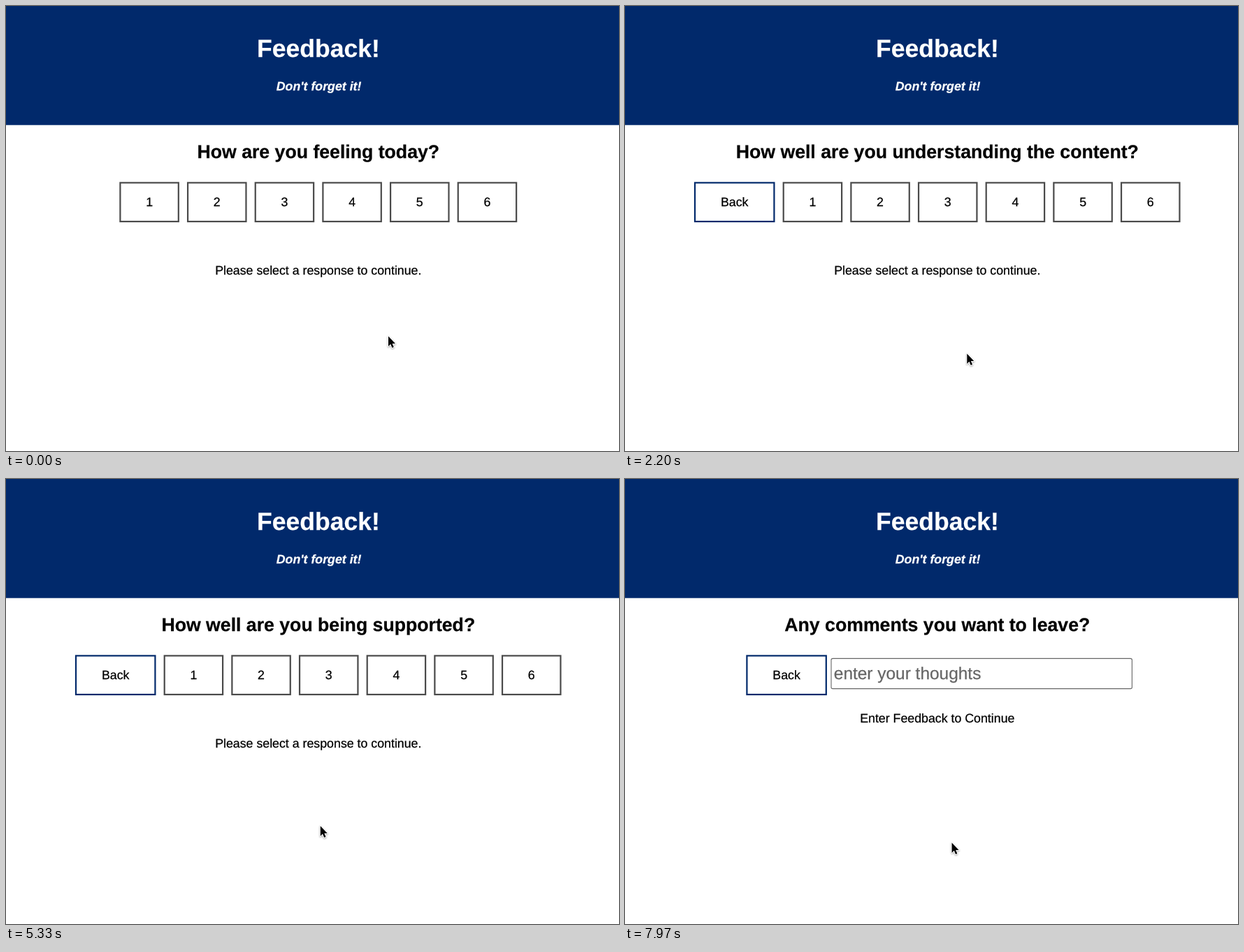
Recreate the animation shown at these times as an HTML page. Size 877 by 638 pixels, loop 8000 ms.

```html
<!DOCTYPE html>
<html lang="en">
<head>
<meta charset="utf-8">
<title>Feedback</title>
<style>
html, body { margin: 0; width: 100%; height: 100%; overflow: hidden; background: #fff; }
svg { display: block; width: 877px; height: 638px; cursor: default; }
text {
  font: 17.78px "Liberation Sans", Arial, Helvetica, sans-serif;
  text-anchor: middle;
  text-rendering: geometricPrecision;
  stroke: currentColor;
  stroke-width: .25;
}
.title { font-size: 35.56px; font-weight: bold; }
.sub { font-weight: bold; font-style: italic; }
.title, .sub { fill: #fff; color: #fff; }
.question { font-size: 26.67px; font-weight: bold; }
.score { font-size: 55.56px; font-weight: bold; }
.hint { font-size: 24.44px; fill: #666; color: #666; text-anchor: start; }
.button rect { fill: #fff; stroke: var(--c); stroke-width: 2.2; }
.button.hover rect { fill: var(--c); }
.button.hover text { fill: #fff; color: #fff; }
.field { fill: #fff; stroke: #666; stroke-width: 1.1; }
.arrow { stroke: #fff; stroke-width: 2; stroke-linejoin: round; paint-order: stroke; filter: drop-shadow(0 1px 1px rgba(0,0,0,.35)); }
</style>
</head>
<body>
<svg id="stage" viewBox="0 0 877 638"></svg>
<script>
const LOOP = 8000, MID = 446.8, TOP = 252.3, HIGH = 57.8;
const NAVY = '#01296b', GRAY = '#4a4a4a', GREEN = '#3ea340';
const stage = document.getElementById('stage');

function add(parent, tag, attrs, content) {
  const el = document.createElementNS('http://www.w3.org/2000/svg', tag);
  for (const k in attrs) el.setAttribute(k, attrs[k]);
  if (content) el.textContent = content;
  parent.append(el);
  return el;
}
const group = () => add(stage, 'g', {});
const label = (parent, str, y, cls = '', x = MID) => add(parent, 'text', { x, y, class: cls }, str);

const buttons = [];
function button(parent, str, x, y, w, color) {
  const el = add(parent, 'g', { class: 'button', style: `--c:${color}` });
  add(el, 'rect', { x: x + 1.1, y: y + 1.1, width: w - 2.2, height: HIGH - 2.2 });
  label(el, str, y + 34.5, '', x + w / 2);
  buttons.push({ el, x, y, w });
}

const backButton = (parent, x) => button(parent, 'Back', x, TOP, 115.6, NAVY);

function ratingPage(question, left, back) {
  const g = group();
  label(g, question, 217.5, 'question');
  if (back) backButton(g, 98.9);
  for (let i = 0; i < 6; i++) button(g, String(i + 1), left + 96.67 * i, TOP, 85.6, GRAY);
  return g;
}

function commentPage() {
  const g = group();
  label(g, 'Any comments you want to leave?', 217.5, 'question');
  backButton(g, 173.3);
  add(g, 'rect', { x: 295, y: 257.4, width: 430.4, height: 43.2, rx: 2.2, class: 'field' });
  label(g, 'enter your thoughts', 286.8, 'hint', 298.8);
  label(g, 'Enter Feedback to Continue', 348.8);
  return g;
}

add(stage, 'rect', { width: 877, height: 170.7, fill: NAVY });
label(stage, 'Feedback!', 73.3, 'title', 447);
label(stage, "Don't forget it!", 120.9, 'sub', 447.6);

const pages = [
  { el: ratingPage('How are you feeling today?', 162.3, false), open: 0, answer: 1130, score: '5' },
  { el: ratingPage('How well are you understanding the content?', 225.6, true), open: 2130, answer: 3730, score: '6' },
  { el: ratingPage('How well are you being supported?', 225.6, true), open: 4970, answer: 6730, score: '5' },
  { el: commentPage(), open: 7930 }
];

const prompt = group();
label(prompt, 'Please select a response to continue.', 384.5);

const result = group();
const score = label(result, '', 419.2, 'score');
button(result, 'Next', 391, 489.1, 111.6, GREEN);

const arrow = add(stage, 'path', { class: 'arrow', d: 'M0 0V14.4L3.2 11.3L5.4 16.5L7.8 15.5L5.6 10.4H10Z' });

// pointer moves; bend bows the way up or down
const home = { x: 547, y: 473.5 };
const moves = [
  { from: 30, to: 870, x: 591.3, y: 282.5 },
  { from: 1370, to: 2000, x: 489.3, y: 498.5 },
  { from: 2830, to: 3500, x: 745, y: 288 },
  { from: 4000, to: 4750, x: 449.8, y: 497.5, bend: 106 },
  { from: 5400, to: 6030, x: 689, y: 287, bend: -25 },
  { from: 6770, to: 7230, x: 664.2, y: 322.5 },
  { from: 7270, to: 7600, x: 467.6, y: 521.5 }
];

function pointer(t) {
  let { x, y } = home;
  for (const m of moves) {
    const u = Math.min(1, Math.max(0, (t - m.from) / (m.to - m.from)));
    const k = u * u * (3 - 2 * u);
    x += (m.x - x) * k;
    y += (m.y - y) * k + (m.bend || 0) * 4 * k * (1 - k);
    if (u < 1) break;
  }
  return { x, y };
}

const show = (el, on) => { el.style.display = on ? '' : 'none'; };

function render(t) {
  const page = pages.filter(p => p.open <= t).pop();
  const answered = t >= page.answer;
  for (const p of pages) show(p.el, p === page);
  show(prompt, page.score && !answered);
  show(result, answered);
  score.textContent = page.score || '';

  const { x, y } = pointer(t);
  arrow.setAttribute('transform', `translate(${x} ${y})`);
  for (const b of buttons) {
    const over = x >= b.x && x <= b.x + b.w && y >= b.y && y <= b.y + HIGH;
    b.el.classList.toggle('hover', over);
  }
}

const start = performance.now();
function frame() {
  render((performance.now() - start) % LOOP);
  requestAnimationFrame(frame);
}
frame();
</script>
</body>
</html>
```
